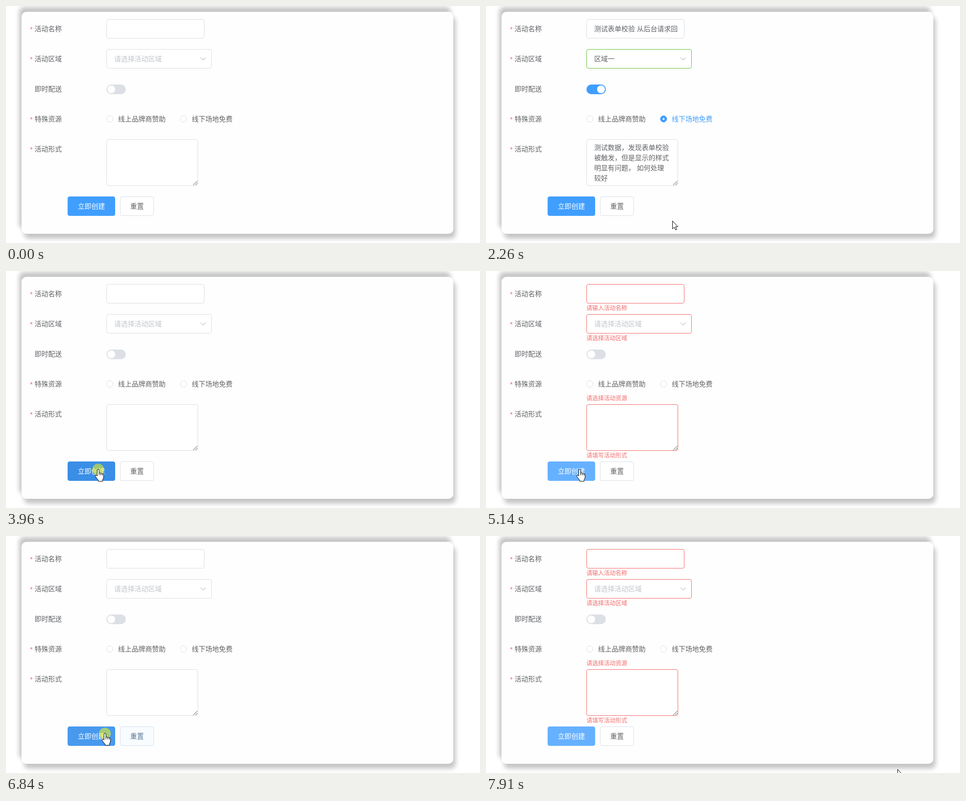
Animation, 977 px wide and 489 px high, one loop 8 s. Source, as an HTML page:

```html
<!DOCTYPE html>
<html lang="zh-CN">
<head>
<meta charset="utf-8">
<style>
  html, body { margin: 0; width: 100%; height: 100%; overflow: hidden; background: #fff; }
  #card {
    position: absolute; left: 32px; top: 12px; width: 890px; height: 458px;
    border-radius: 10px; background: #fefefe;
    box-shadow: 5px 10px 10px #c6c6c6, -5px -10px 10px #c6c6c6;
  }
  #form { position: absolute; left: 0; top: 0; }
  text { font: 14px "Noto Sans CJK SC", "Noto Sans CJK", sans-serif; word-spacing: .9px; }
  .star { font: 14px "Liberation Sans", sans-serif; }
  .error { font-size: 12px; }
</style>
</head>
<body>
<div id="card"></div>
<svg id="form" width="977" height="489"></svg>
<script>
const LOOP = 8000;
const BLUE = '#409eff', LIGHT = '#66b1ff', DARK = '#3a8ee6', GREEN = '#67c23a', RED = '#f56c6c';
const INK = '#606266', LINE = '#dcdfe6', HINT = '#c0c4cc', WHITE = '#ffffff', PALE = '#ecf5ff', SKY = '#c6e2ff';

// The pointer appears, visits the buttons in turn, clicks each, and leaves in an arc.
const START = { x: 384, y: 443 };
const VISITS = [
  { button: 'reset', go: 2260, arrive: 2650, x: 262, y: 412, down: 2790, up: 2890 },
  { button: 'submit', go: 3400, arrive: 3580, x: 190, y: 410, down: 3690, up: 4030 },
  { button: 'reset', go: 5100, arrive: 5430, x: 268, y: 408, down: 5620, up: 5670 },
  { button: 'submit', go: 6420, arrive: 6600, x: 204, y: 408, down: 6800, up: 6915 }
];
const EXIT = { go: 7340, arrive: 7910, x: 848, y: 481, lift: 110 };
const MOVES = [...VISITS, EXIT];
const FILL = 470, CLEAR = VISITS[0].up;

// Tracks are lists of [time, new value].
const hover = visit => (visit.go + visit.arrive) / 2;
const toggle = (on, off) => [[0, 0], [on, 1], [off, 0]];
const visitTrack = (button, base, keysOf) => [[0, base], ...VISITS.flatMap((visit, i) =>
  visit.button === button ? keysOf(visit) : [[visit.down, base]])];

const SWITCH = toggle(FILL, CLEAR);
const SELECT_OK = toggle(FILL, CLEAR + 50);
const ERRORS = [[0, 0], ...VISITS.map(v => [v.up, v.button === 'submit' ? 1 : 0])];
const SUBMIT = visitTrack('submit', BLUE, v => [[hover(v), LIGHT], [v.down, DARK], [v.up, LIGHT]]);
const RESET_FILL = visitTrack('reset', WHITE, v => [[hover(v), PALE]]);
const RESET_TEXT = visitTrack('reset', INK, v => [[hover(v), BLUE], [v.down, DARK], [v.up, BLUE]]);
const RESET_LINE = visitTrack('reset', LINE, v => [[hover(v), SKY], [v.down, DARK], [v.up, SKY]]);

const clamp = v => Math.min(1, Math.max(0, v));
const lerp = (a, b, p) => a + (b - a) * p;
const ease = p => (1 - (1 - p) ** 3) ** 1.7;
const smooth = p => p * p * (3 - 2 * p);

function mix(a, b, p) {
  const channel = (color, i) => parseInt(color.slice(i, i + 2), 16);
  return `rgb(${[1, 3, 5].map(i => Math.round(lerp(channel(a, i), channel(b, i), p)))})`;
}

function track(t, keys, duration, blend = lerp) {
  const i = keys.findLastIndex(([time]) => time <= t);
  const [time, value] = keys[i];
  return blend(keys[Math.max(0, i - 1)][1], value, ease(clamp((t - time) / duration)));
}

// y is the middle of the text line.
const label = (x, y, words, fill = INK) => `<text x="${x}" y="${y + 5}" fill="${fill}">${words}</text>`;
const box = (x, y, w, h, stroke, fill = WHITE) =>
  `<rect x="${x + .5}" y="${y + .5}" width="${w - 1}" height="${h - 1}" rx="3.5" fill="${fill}" stroke="${stroke}"/>`;
const disc = (x, y, r, fill, extra = '') => `<circle cx="${x}" cy="${y}" r="${r}" fill="${fill}" ${extra}/>`;

function field(row, name, required = true) {
  const y = 47 + 62 * row;
  const star = required ? `<text class="star" x="49.5" y="${y + 6}" fill="${RED}">*</text>` : '';
  return star + label(59, y, name);
}

function radio(x, words, checked, dot = 1) {
  return disc(x, 233, 6.5, checked ? BLUE : WHITE, `stroke="${checked ? BLUE : LINE}"`) +
    (checked ? disc(x, 233, 2 * dot, WHITE) : '') +
    label(x + 17, 233, words, checked ? BLUE : INK);
}

// Messages unfold downwards from their top edge.
const error = (top, words, shown) => `<g opacity="${shown}" transform="translate(207 ${top}) scale(1 ${shown})">
  <text class="error" y="14" fill="${RED}">${words}</text></g>`;

function pointer(t) {
  const i = MOVES.findLastIndex(move => move.go <= t);
  if (i < 0) return '';
  const from = MOVES[i - 1] || START, to = MOVES[i];
  const p = smooth(clamp((t - to.go) / (to.arrive - to.go)));
  const x = lerp(from.x, to.x, p);
  const y = lerp(from.y, to.y, p) - (to.lift || 0) * Math.sin(Math.PI * p);
  const over = (left, right) => x > left && x < right && y > 393 && y < 433;
  const shape = over(127, 225) || over(235, 305)
    ? `<path d="M-2 1a2 2 0 0 1 4 0v6q2-1 3.5.6q2-.6 3.3.8q2.4-.4 2.4 2v5q0 3-2 5v3.5h-9v-2.5q-3-3-5.5-7q-1.5-2 0-3q1.8-.8 3.3 1.6z"/>
       <path d="M2 7v4.5M5.5 7.6v4M8.8 8.4v3.4" fill="none"/>`
    : '<path d="M.5.5V16.8L4.2 13.4 6.8 19 9.2 18 6.7 12.3H11.5z"/>';
  const glow = t >= to.down && t < to.up ? disc(x, y - .5, 12, '#ffff00', 'opacity=".5"') : '';
  return `${glow}<g transform="translate(${Math.round(x)} ${Math.round(y)})" fill="#fff" stroke="#000">${shape}</g>`;
}

function draw(t) {
  const filled = t >= FILL && t < CLEAR;
  const on = track(t, SWITCH, 300);
  const shown = track(t, ERRORS, 200);
  const selectOk = track(t, SELECT_OK, 200);
  const border = mix(LINE, RED, shown);
  const submit = track(t, SUBMIT, 100, mix);
  const notes = ['测试数据，发现表单校验', '被触发，但是显示的样式', '明显有问题， 如何处理', '较好'];

  return field(0, '活动名称') + box(207, 27, 202, 40, border) +
    (filled ? `<svg width="394" height="70">${label(223, 47, '测试表单校验 从后台请求回')}</svg>` : '') +
    error(67, '请输入活动名称', shown) +

    field(1, '活动区域') + box(207, 89, 217, 40, selectOk > 0 ? mix(LINE, GREEN, selectOk) : border) +
    (filled ? label(223, 109, '区域一') : label(223, 109, '请选择活动区域', HINT)) +
    `<path d="M401.500 106.500l5 5 5-5" fill="none" stroke="${HINT}" stroke-width="1.2"/>` +
    error(129, '请选择活动区域', shown) +

    field(2, '即时配送', false) +
    `<rect x="207" y="162" width="40" height="20" rx="10" fill="${mix(LINE, BLUE, on)}"/>` +
    disc(217 + 20 * on, 172, 8, WHITE) +

    field(3, '特殊资源') + radio(214, '线上品牌商赞助', false) +
    radio(366, '线下场地免费', filled, clamp((t - FILL) / 150)) +
    error(253, '请选择活动资源', shown) +

    field(4, '活动形式') + box(207, 275, 189, 96, border) +
    (filled ? notes.map((line, i) => label(223, 292 + 21 * i, line)).join('') : '') +
    '<path d="M386 369.5l8.5-8.5M390.5 369.5l4-4" stroke="#444"/>' +
    error(371, '请填写活动形式', shown) +

    box(127, 393, 98, 40, submit, submit) + label(148, 413, '立即创建', WHITE) +
    box(235, 393, 70, 40, track(t, RESET_LINE, 100, mix), track(t, RESET_FILL, 100, mix)) +
    label(256, 413, '重置', track(t, RESET_TEXT, 100, mix)) +
    pointer(t);
}

const form = document.getElementById('form');
function frame() {
  form.innerHTML = draw(performance.now() % LOOP);
  requestAnimationFrame(frame);
}
frame();
</script>
</body>
</html>
```
